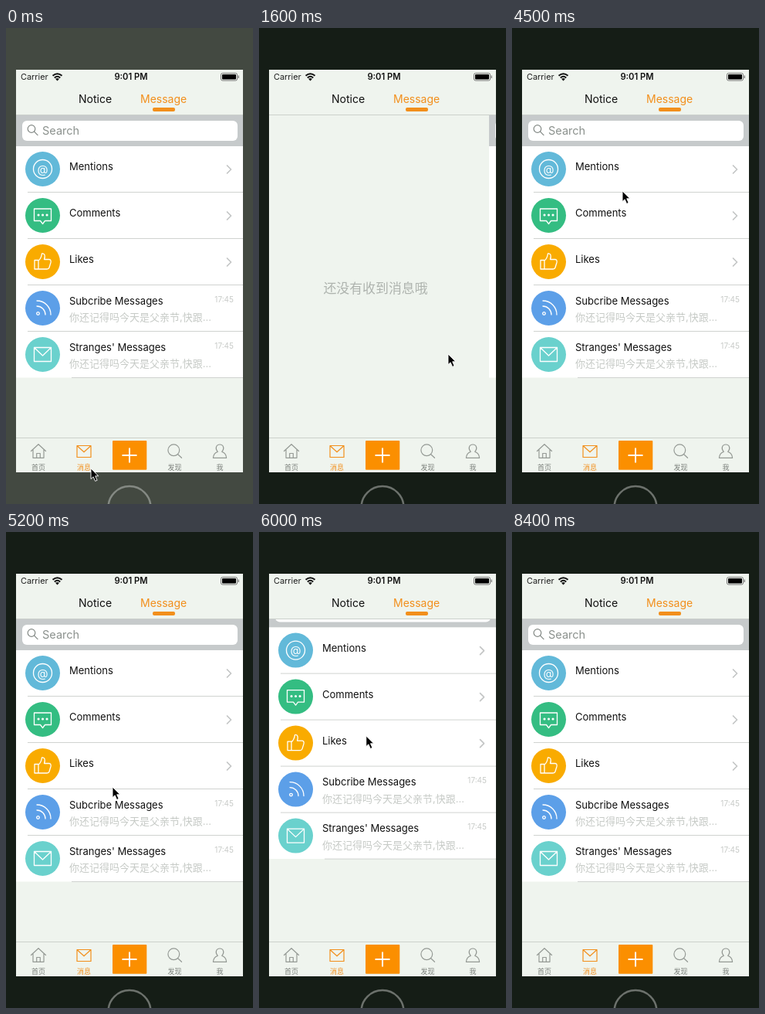
Write an HTML page that moves like this. It is 320 px wide and 616 px high and loops after 8.6 s.

```html
<!DOCTYPE html>
<html lang="en">
<head>
<meta charset="utf-8">
<title>Message tabs</title>
<style>
html, body { margin: 0; width: 100%; height: 100%; overflow: hidden; }
svg { display: block; width: 100vw; height: 100vh; font-family: Inter, "Noto Sans CJK SC", "Noto Sans CJK", sans-serif; }
.line { fill: none; stroke-linecap: round; stroke-linejoin: round; }
</style>
</head>
<body>
<svg viewBox="0 0 320 616">
  <defs>
    <clipPath id="view"><path d="M13 113H307V530H13Z"/></clipPath>
  </defs>
  <rect id="bezel" width="320" height="616"/>
  <circle id="home" cx="160" cy="620.5" r="27.5" fill="none" stroke-width="2.5"/>
  <rect x="13" y="54" width="294" height="521" fill="#eff4ee"/>

  <g clip-path="url(#view)">
    <text id="empty" x="160" y="343" font-size="16.9" text-anchor="middle" fill="#aeb3ae">还没有收到消息哦</text>
    <g id="list">
      <path d="M13 112H307V153H13Z" fill="#c6cacb"/>
      <rect x="21" y="120" width="279" height="26" rx="6" fill="#fff"/>
      <g class="line" stroke="#838985" stroke-width="1.2">
        <circle cx="33" cy="130.5" r="4.8"/><path d="M36.6 134.2L41 138.6"/>
      </g>
      <text x="47" y="137.5" font-size="14.5" fill="#8b918d">Search</text>
      <path d="M13 153H307V452.5H13Z" fill="#fff"/>
      <g id="rows"></g>
    </g>
  </g>

  <path d="M13 112.5H307M13 530.5H307" stroke="#cbd0cb"/>
  <text x="19" y="67" font-size="10.9" fill="#222">Carrier</text>
  <g class="line" stroke="#111" stroke-width="2" style="stroke-linecap:butt">
    <path d="M60.5 61.8Q66.5 56.6 72.5 61.8M62.8 64.4Q66.5 61.2 70.2 64.4"/>
  </g>
  <path d="M64 65.8Q66.5 64 69 65.8L66.5 68.4Z" fill="#111"/>
  <text x="162" y="67" font-size="11.2" font-weight="600" text-anchor="middle" fill="#111">9:01 PM</text>
  <rect x="278.5" y="58.5" width="21" height="9.5" rx="2" fill="none" stroke="#777"/>
  <rect x="280" y="60" width="18" height="6.5" rx=".8" fill="#000"/>
  <path d="M301.3 61.5V65" stroke="#777" stroke-width="1.2"/>
  <text id="notice" x="94" y="97.3" font-size="14">Notice</text>
  <text id="message" x="174" y="97.3" font-size="14">Message</text>
  <rect id="bar" y="103" width="29" height="5" rx="2" fill="#f28f1c"/>

  <g class="line" stroke="#959a95" stroke-width="1.2">
    <path d="M32.5 547.5L42 538.7L51.5 547.5M35 546V556.3H49V546M39.7 556V550.5H44.3V556"/>
    <circle cx="217.3" cy="546.3" r="7.4"/><path d="M222.7 551.7L227.5 556.3"/>
    <path d="M274.3 548.3C270.5 544.5 272.2 539 277 539S283.5 544.5 279.7 548.3Q285 549.8 285.6 556.3H268.4Q269 549.8 274.3 548.3Z"/>
    <path stroke="#f28f1c" d="M92 540.5H110V555.5H92ZM92.5 541L101 548.8L109.5 541"/>
  </g>
  <g font-size="9" text-anchor="middle" fill="#7d827d">
    <text x="42" y="572">首页</text>
    <text x="101" y="572" fill="#f28f1c" font-weight="500">消息</text>
    <text x="218.5" y="572">发现</text>
    <text x="277" y="572">我</text>
  </g>
  <rect x="138" y="534" width="44.3" height="37.7" rx="1" fill="#fb8f00"/>
  <path d="M150.5 553H169.5M160 543.5V562.5" stroke="#fff" stroke-width="2"/>

  <path id="cursor" d="M0 0V13.6L3.1 10.8L5.6 16.4L8.1 15.3L5.7 9.8H9.8Z" fill="#000" stroke="#fff" stroke-width=".9"/>
</svg>
<script>
const LOOP = 8600, STEP = 100, PAGE = 294, ORANGE = '#f28f1c';
const $ = id => document.getElementById(id);

// Row icons are drawn around the centre of their circle.
const rows = [
  ['Mentions', '#62b9d9', '<circle r="12"/><text y="5" font-size="14.5" text-anchor="middle" fill="#fff" stroke="none">@</text>'],
  ['Comments', '#34bd82', '<path d="M-11 -8.5H11V7H3L0 11L-3 7H-11Z"/><path d="M-5.5 -.5h.1M0 -.5h.1M5.5 -.5h.1" stroke-width="3"/>'],
  ['Likes', '#f9ab00', '<path d="M-10.5 -2H-5.5V9.5H-10.5ZM-5.5 -1.5C-2 -4 -1.5 -7 -1 -10.5C3 -11.5 3.5 -7 2 -3H8.5Q11.3 -2.5 10.5 1L8.5 7.5Q8 9.5 5.5 9.5H-5.5"/>'],
  ['Subcribe Messages', '#5c9fe8', '<circle cx="-6" cy="7" r="1.8"/><path d="M-7.5 -2.5A11 11 0 0 1 3.5 8.5M-7.5 -9.5A18 18 0 0 1 10.5 8.5"/>'],
  ["Stranges' Messages", '#6ad1cd', '<path d="M-11 -9H11V9H-11ZM-10.5 -8.5L0 1.5L10.5 -8.5"/>']
];
$('rows').innerHTML = rows.map(([name, color, icon], i) => {
  const y = 182.5 + 60 * i;
  const detail = i < 3
    ? `<path class="line" d="M286.5 ${y - 4.5}l5 5l-5 5" stroke="#c4c6c6" stroke-width="1.7"/>`
    : `<text x="82" y="${y + 16.5}" font-size="13" fill="#c6cac6">你还记得吗今天是父亲节,快跟...</text>
       <text x="295" y="${y - 8}" font-size="10" text-anchor="end" fill="#c8cbc8">17:45</text>`;
  return `<circle cx="47.5" cy="${y}" r="22.5" fill="${color}"/>
    <g class="line" transform="translate(47.5 ${y})" stroke="#fff" stroke-width="1.3">${icon}</g>
    <text x="82" y="${i < 3 ? y + 1.5 : y - 5}" font-size="13" fill="#111">${name}</text>${detail}
    <path d="M${i < 4 ? 28 : 85} ${y + 30}H307" stroke="#d0d3d0"/>`;
}).join('');

// Each key is [time, value, ...]; values run straight between keys.
const pointer = [
  [0, 110, 570], [400, 122, 441], [600, 122, 441], [1000, 60, 416], [1200, 66, 418],
  [1400, 180, 421], [1600, 245, 422], [2000, 228, 400], [2900, 196, 106], [3200, 196, 102],
  [3600, 196, 102], [4000, 149, 108], [4500, 143, 211], [4900, 138, 330], [5200, 138, 330],
  [5500, 139, 271], [5700, 139, 238], [5900, 139, 245], [6400, 138, 340], [6700, 138, 346],
  [7200, 110, 430], [7600, 85, 530], [8300, 78, 604]
];
const slide = [
  [1100, 0], [1200, 8], [1300, 70], [1400, 170], [1500, 250], [1600, 285], [1700, 291],
  [1900, PAGE], [3100, PAGE], [3200, 292], [3300, 215], [3400, 80], [3500, 8], [3600, 0]
];
const scroll = [[5200, 0], [5500, -27], [5700, -42], [5900, -38], [6400, 5], [6600, 0]];

function at(keys, t) {
  const n = keys.findIndex(k => k[0] > t);
  if (n === 0) return keys[0].slice(1);
  if (n < 0) return keys[keys.length - 1].slice(1);
  const a = keys[n - 1], b = keys[n], p = (t - a[0]) / (b[0] - a[0]);
  return a.slice(1).map((v, i) => v + (b[i + 1] - v) * p);
}
const mix = (a, b, p) => `rgb(${a.map((v, i) => Math.round(v + (b[i] - v) * p))})`;
const move = (id, x, y) => $(id).setAttribute('transform', `translate(${x} ${y})`);

function draw(now) {
  const t = Math.floor(now % LOOP / STEP) * STEP;
  const dim = Math.min(t / 400, 1);
  $('bezel').setAttribute('fill', mix([67, 73, 65], [21, 29, 22], dim));
  $('home').setAttribute('stroke', mix([132, 137, 131], [108, 113, 108], dim));

  const [x] = at(slide, t), [y] = at(scroll, t);
  move('list', x, y);
  move('empty', x - PAGE, 0);

  const onNotice = t >= 2100 && t < 3600;
  $('notice').setAttribute('fill', onNotice ? ORANGE : '#111');
  $('message').setAttribute('fill', onNotice ? '#111' : ORANGE);
  $('bar').setAttribute('x', onNotice ? 102 : 190);

  move('cursor', ...at(pointer, t));
  $('cursor').setAttribute('visibility', t < 8400 ? 'visible' : 'hidden');
}

const start = performance.now();
function tick() {
  draw(performance.now() - start);
  requestAnimationFrame(tick);
}
tick();
</script>
</body>
</html>
```
